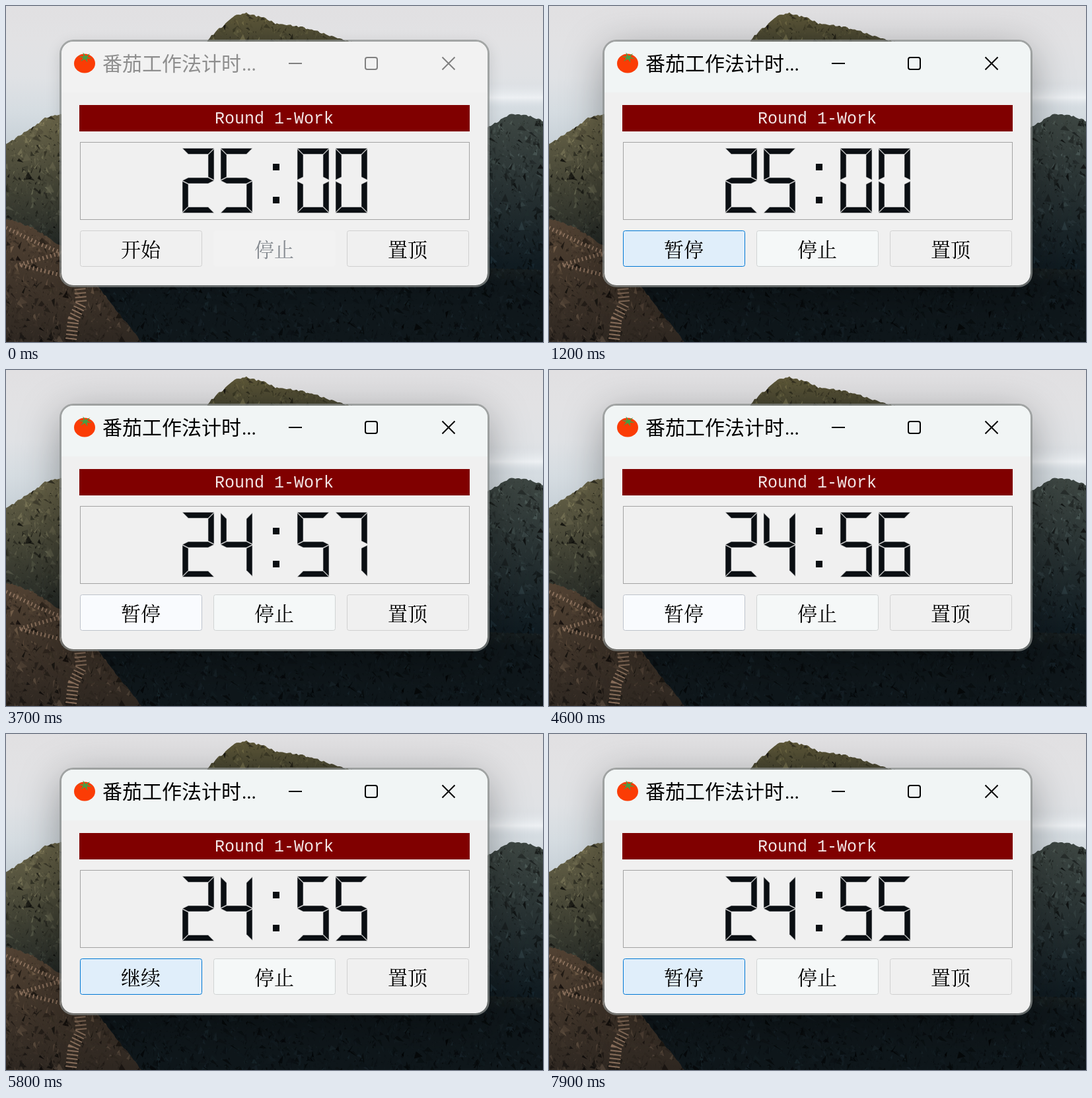
Recreate the animation shown at these times as an HTML page with a canvas. Size 813x509 px, loop 8 s.

```html
<!DOCTYPE html>
<html lang="zh-CN">
<meta charset="utf-8">
<style>
  html, body { margin: 0; width: 100%; height: 100%; overflow: hidden; }
  canvas { display: block; }
</style>
<canvas id="stage" width="813" height="509"></canvas>
<script>
const W = 813, H = 509, LOOP = 8000;
const g = stage.getContext('2d');
const SANS = '"Noto Sans CJK SC", "Noto Sans CJK", sans-serif';
const SERIF = '200 30px "Noto Serif CJK SC", "Noto Sans CJK SC", "Noto Sans CJK", serif';

const mix = (a, b, k) => a.map((v, i) => v + (b[i] - v) * k);
const rgb = c => `rgb(${c.map(Math.round)})`;
const grey = v => rgb([v, v, v]);

function polygon(c, points) {
  c.beginPath();
  for (const [x, y] of points) c.lineTo(x, y);
  c.closePath();
}

// ---------- landscape, painted once ----------
let seed = 7;
function rnd() {
  seed = (seed * 1664525 + 1013904223) >>> 0;
  return seed / 4294967296;
}

function vertical(c, y0, y1, ...colors) {
  const grad = c.createLinearGradient(0, y0, 0, y1);
  colors.forEach((col, i) => grad.addColorStop(i / (colors.length - 1), col));
  return grad;
}

// Slope below a jagged ridge, shaded from top to foot, with light and dark chips of rock.
function hill(c, ridge, top, foot, depth, contrast) {
  const outline = [];
  ridge.slice(1).forEach(([x1, y1], i) => {
    const [x0, y0] = ridge[i];
    for (let x = x0; x < x1; x += 3)
      outline.push([x, y0 + (y1 - y0) * (x - x0) / (x1 - x0) + rnd() * 3 - 1.5]);
  });
  const left = ridge[0][0], right = ridge.at(-1)[0];
  const peak = Math.min(...ridge.map(p => p[1]));
  c.save();
  polygon(c, [...outline, ridge.at(-1), [right, H], [left, H]]);
  c.fillStyle = vertical(c, peak, peak + depth, rgb(top), rgb(foot));
  c.fill();
  c.clip();
  const count = (right - left) * (H - peak) / 22;
  for (let i = 0; i < count; i++) {
    const x = left + rnd() * (right - left), y = peak + rnd() * (H - peak);
    const size = 2 + 13 * rnd() ** 3, angle = 0.6 + rnd() * 1.7;
    const base = mix(top, foot, Math.min(1, (y - peak) / depth));
    const shade = 1 + contrast * (rnd() + rnd() - 1.1);
    c.globalAlpha = 0.75;
    c.fillStyle = rgb(base.map(v => v * shade));
    polygon(c, [[x, y], [x + size * Math.cos(angle), y + size * Math.sin(angle)],
      [x - size * rnd() * 0.6, y + size * rnd()]]);
    c.fill();
  }
  c.restore();
}

function trail(c, points, width) {
  c.strokeStyle = '#8a705c';
  c.lineWidth = width;
  c.setLineDash([2, 4]);
  c.beginPath();
  for (const [x, y] of points) c.lineTo(x, y);
  c.stroke();
}

function paintLandscape() {
  const layer = document.createElement('canvas');
  layer.width = W;
  layer.height = H;
  const c = layer.getContext('2d');
  c.fillStyle = vertical(c, 0, 215, '#e1e0e2', '#e2e2e4', '#e0e2e5', '#d5dce1', '#c6cfd6');
  c.fillRect(0, 0, W, H);
  c.fillStyle = vertical(c, 118, 160, '#e6eaee00', '#edf0f3', '#c9d3db00');
  c.fillRect(700, 118, 113, 42);

  hill(c, [[300, 60], [308, 48], [346, 14], [364, 11], [390, 18], [410, 27], [445, 31], [535, 58]],
    [92, 86, 55], [62, 62, 46], 60, 0.9);
  hill(c, [[640, 300], [731, 183], [762, 165], [785, 164], [813, 174]], [62, 71, 67], [16, 27, 33], 230, 0.9);
  hill(c, [[0, 210], [38, 185], [62, 168], [90, 164], [150, 380], [813, 400]],
    [106, 101, 73], [15, 23, 27], 255, 0.95);
  hill(c, [[0, 322], [40, 335], [100, 375], [205, 509]], [82, 66, 51], [46, 39, 33], 190, 0.95);
  trail(c, [[0, 336], [50, 360], [84, 374], [20, 392], [84, 408]], 6);
  trail(c, [[112, 428], [114, 450], [102, 475], [98, H]], 17);
  return layer;
}

// ---------- timeline ----------
let t = 0;
const ramp = (start, steps) => Math.min(1, Math.max(0, ((t - start) / 100 + 1) / steps));

// fill and border colour of each button look
const IDLE = [240, 240, 240, 208, 208, 208];
const FOCUS = [249, 251, 254, 190, 195, 203];
const HOVER = [224, 238, 250, 0, 120, 212];
const PRESS = [204, 228, 247, 0, 84, 153];
const START = 1100, PAUSE = 5800, RESUME = 7900;
const buttonFades = [
  [400, 4, HOVER], [900, 2, PRESS], [START, 2, HOVER], [1500, 3, FOCUS],
  [5100, 3, HOVER], [5500, 2, PRESS], [PAUSE, 1, HOVER], [6700, 2, FOCUS],
  [7100, 2, HOVER], [7700, 1, PRESS], [RESUME, 1, HOVER]];

function mainLabel() {
  if (t < START) return '开始';
  return t >= PAUSE && t < RESUME ? '继续' : '暂停';
}

function clockText() {
  const elapsed = Math.min(5, Math.max(0, Math.floor((t - 870) / 920)));
  const left = 25 * 60 - elapsed;
  return Math.floor(left / 60) + ':' + String(left % 60).padStart(2, '0');
}

// ---------- window parts ----------
function text(str, x, y, font, color, align = 'left') {
  g.font = font;
  g.fillStyle = color;
  g.textAlign = align;
  g.fillText(str, x, y);
}

function roundBox(x, y, w, h, r) {
  g.beginPath();
  g.roundRect(x, y, w, h, r);
}

function drawButton(x, label, look, color = '#000') {
  roundBox(x + 0.5, 340.5, 184, 54, 3);
  g.fillStyle = rgb(look.slice(0, 3));
  g.fill();
  g.strokeStyle = rgb(look.slice(3));
  g.lineWidth = 1;
  g.stroke();
  text(label, x + 92, 380, SERIF, color, 'center');
}

// Seven segments: mirrored trapezoids around a hexagon.
const SIZE = 48, THICK = 9, MID = SIZE + 1, HALF = THICK / 2;
const bar = (y, dir) => [[0, y], [SIZE, y], [SIZE - THICK, y + THICK * dir], [THICK, y + THICK * dir]];
const side = (x, dx, y, dy) => [[x, y + dy], [x, y + SIZE * dy],
  [x + THICK * dx, y + (SIZE - HALF) * dy], [x + THICK * dx, y + (THICK + 1) * dy]];
const SEGMENTS = {
  a: bar(0, 1), d: bar(2 * MID, -1),
  f: side(0, 1, 0, 1), b: side(SIZE, -1, 0, 1),
  e: side(0, 1, 2 * MID, -1), c: side(SIZE, -1, 2 * MID, -1),
  g: [[0, MID], [THICK, MID - HALF], [SIZE - THICK, MID - HALF],
    [SIZE, MID], [SIZE - THICK, MID + HALF], [THICK, MID + HALF]]
};
const LIT = 'abcdef bc abdeg abcdg bcfg acdfg acdefg abc abcdefg abcdfg'.split(' ');

function drawClock(str) {
  g.lineWidth = 1;
  g.strokeStyle = '#a3a3a3';
  g.strokeRect(112.5, 206.5, 589, 117);
  g.fillStyle = '#0b0f13';
  g.strokeStyle = '#d8d8d8';
  g.lineWidth = 0.6;
  [...str].forEach((ch, i) => {
    g.save();
    g.translate(267 + 58 * i, 215.5);
    if (ch === ':') {
      g.fillRect(21, 23.5, 10, 10);
      g.fillRect(21, 73.5, 10, 10);
    } else for (const s of LIT[ch]) {
      polygon(g, SEGMENTS[s]);
      g.fill();
      g.stroke();
    }
    g.restore();
  });
}

function drawTomato() {
  g.fillStyle = '#fb3c05';
  g.beginPath();
  g.ellipse(119, 87, 16, 14.5, 0, 0, 7);
  g.fill();
  g.fillStyle = '#43a047';
  polygon(g, Array.from({ length: 12 }, (_, i) => {
    const a = i * Math.PI / 6 + 0.2, r = i % 2 ? 3 : 11;
    return [120 + r * Math.cos(a), 78 + r * 0.75 * Math.sin(a)];
  }));
  g.fill();
}

function drawTitleBar(active) {
  g.save();
  roundBox(84, 54, 645, 369, 18);
  g.clip();
  g.fillStyle = rgb(mix([242, 242, 242], [241, 245, 245], active));
  g.fillRect(84, 54, 645, 77);
  g.restore();

  drawTomato();
  const ink = grey(142 * (1 - active));
  text('番茄工作法计时', 146, 98, '30px ' + SANS, ink);
  text('...', 357, 98, '26px ' + SANS, ink);

  g.strokeStyle = grey(128 * (1 - active));
  g.lineWidth = 2;
  g.beginPath();
  g.moveTo(428, 87); g.lineTo(448, 87);
  g.moveTo(660.5, 77.5); g.lineTo(679.5, 96.5);
  g.moveTo(679.5, 77.5); g.lineTo(660.5, 96.5);
  g.stroke();
  roundBox(544, 78, 18, 18, 3);
  g.stroke();
}

function drawFrame(active) {
  g.save();
  g.shadowColor = `rgba(0,0,0,${0.16 + 0.2 * active})`;
  g.shadowBlur = 24 + 40 * active;
  g.shadowOffsetY = 6 + 8 * active;
  roundBox(84, 54, 645, 369, 18);
  g.fillStyle = '#f0f0f0';
  g.fill();
  g.restore();
  roundBox(82.5, 52.5, 648, 372, 19.5);
  g.strokeStyle = 'rgba(140,144,143,.7)';
  g.lineWidth = 3;
  g.stroke();
}

function draw(now) {
  t = Math.floor(now % LOOP / 100) * 100;
  const active = ramp(900, 4), running = t >= START;
  g.drawImage(landscape, 0, 0);
  drawFrame(active);
  drawTitleBar(active);

  g.fillStyle = '#800000';
  g.fillRect(111, 150, 591, 40);
  text('Round 1-Work', 406, 178, '25px "Liberation Mono", monospace', '#f3e6e6', 'center');

  drawClock(clockText());
  const look = buttonFades.reduce((c, [start, steps, next]) => mix(c, next, ramp(start, steps)), IDLE);
  drawButton(112, mainLabel(), look);
  drawButton(314, '停止', running ? [245, 248, 248, 208, 211, 211] : [242, 242, 242, 241, 241, 241],
    running ? '#000' : '#858a90');
  drawButton(516, '置顶', IDLE);
}

const landscape = paintLandscape();
const begin = performance.now();
function tick() {
  draw(performance.now() - begin);
  requestAnimationFrame(tick);
}
tick();
</script>
</html>
```
